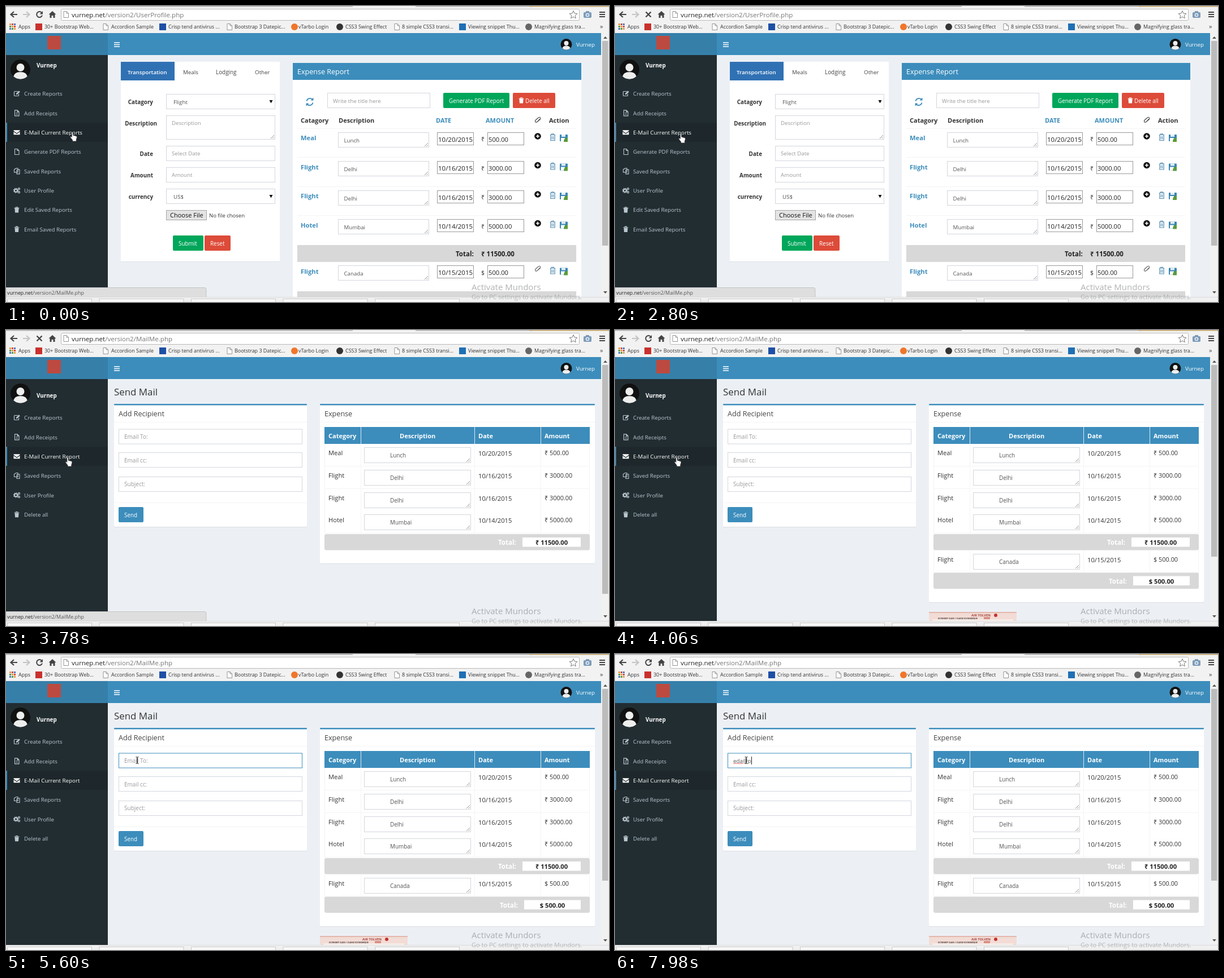
An HTML page that plays this animation: 1066 px wide and 525 px high, repeating every 8000 ms.

```html
<!DOCTYPE html>
<html lang="en">
<head>
<meta charset="utf-8">
<title>Expense report by mail</title>
<style>
html, body { margin: 0; width: 100%; height: 100%; overflow: hidden; background: #ecf0f5; }
svg { display: block; width: 1066px; height: 525px; font-family: "Open Sans", "Noto Sans", sans-serif; }
</style>
</head>
<body>
<svg id="stage" viewBox="0 0 1066 525" xmlns="http://www.w3.org/2000/svg"></svg>
<script>
const LOOP = 8000;
const BLUE = '#3c8dbc', LINE = '#f4f4f4', EDGE = '#d2d6de', HINT = '#999', INK = '#333', SIDE = '#b8c7ce';
const HOST = 'vurnep.net', USER = 'Vurnep', TYPED = 'eda@p';

// y is the middle of the capitals
const text = (x, y, s, size, fill, more = '') =>
  `<text x="${x}" y="${y + size * .36}" font-size="${size}" fill="${fill}" ${more}>${s}</text>`;
const bold = (x, y, s, size, fill, more = '') => text(x, y, s, size, fill, 'font-weight="700" ' + more);
const rect = (x, y, x2, y2, fill, more = '') =>
  `<rect x="${x}" y="${y}" width="${x2 - x}" height="${y2 - y}" fill="${fill}" ${more}/>`;
const box = (x, y, x2, y2, stroke = EDGE, fill = '#fff', more = '') =>
  rect(x + .5, y + .5, x2 - .5, y2 - .5, fill, `stroke="${stroke}" ${more}`);
const path = (d, stroke, width = 1, fill = 'none', more = '') =>
  `<path d="${d}" stroke="${stroke}" stroke-width="${width}" fill="${fill}" ${more}/>`;
const dot = (x, y, r, fill) => `<circle cx="${x}" cy="${y}" r="${r}" fill="${fill}"/>`;
const group = (id, s, more = '') => `<g id="${id}" ${more}>${s}</g>`;
const at = (x, y, s) => `<g transform="translate(${x} ${y})">${s}</g>`;
const button = (x, y, x2, y2, fill, label, lx) =>
  rect(x, y, x2, y2, fill, 'rx="2"') + text(lx, (y + y2) / 2 + .5, label, 9.9, '#fff');
const area = (x, y, x2, y2) => box(x, y, x2, y2) +
  path(`M${x2 - 8} ${y2 - 2}l6-6M${x2 - 4.5} ${y2 - 2}l2.5-2.5`, '#888', .9);

const icons = {
  edit: c => path('M2-4h-5.5q-1 0-1 1v6q0 1 1 1h6q1 0 1-1v-2.500', c, 1.2) + path('M-1 1.500l.3-2 4.500-4.500 1.800 1.800-4.500 4.400z', c, .4, c),
  file: c => path('M-3.500-5h4.500l3 3v7h-7.500zM1-5v3h3', c, 1.1),
  lines: c => icons.file(c) + path('M-1.500 0h3.500M-1.500 2.500h3.500', c, .9),
  mail: c => path('M-5.500-4h11v1.300l-5.500 4-5.500-4zM-5.500-1.300l5.500 4 5.500-4v5.300h-11z', 'none', 0, c),
  copy: c => path('M-1-5h3v7h-6.500v-5zM0-1.800l2.500-1h2.500v7.800h-5z', c, 1.1),
  cogs: c => `<circle cx="-1.500" r="2.600" fill="none" stroke="${c}" stroke-width="2"/>` +
    `<circle cx="-1.500" r="4" fill="none" stroke="${c}" stroke-width="1.300" stroke-dasharray="1.600 1.540"/>` +
    [-3, 3].map(y => `<circle cx="4" cy="${y}" r="1.500" fill="none" stroke="${c}" stroke-width="1.300"/>`).join(''),
  trash: c => path('M-3.500-2.500h7l-.5 7.500h-6z', 'none', 0, c) + path('M-4.500-3.200h9M-1.500-3.500v-1.300h3v1.300', c, 1.1),
  bin: c => path('M-4.500-4h9M-1.800-4v-1.800h3.600v1.800M-3.700-4v10h7.400v-10M-1.300-1.500v5.500M1.300-1.500v5.500', c, 1.1),
  page: () => path('M-4-5.500h5l3.500 3.500v7.500h-8.500zM1-5.500v3.500h3.500', '#888', .9, '#fff'),
  clip: c => path('M4-2l-5 5.500q-1.800 1.500-3.200 0-1-1.500.4-3l5-4.500q2-1.400 3.300 0 1.200 1.500-.3 3l-4.500 4', c, 1.1),
  save: () => rect(-7, -6, 7, 6, '#3a86b4', 'rx="1"') + rect(-4, -6, 3, -2, '#e4edf2') + rect(-5, 0, 2, 6, '#fff') +
    path('M0 7q0-8 7-7.500v7.500z', 'none', 0, '#5a9a3a'),
};
const icon = (name, x, y, c) => at(x, y, icons[name](c));

const avatar = (x, y, r) => {
  const k = r / 10;
  return dot(x, y, r, '#111') + dot(x, y - 2 * k, 4 * k, '#eee') +
    path(`M${x - 7 * k} ${y + 7 * k}q${k}-${4.5 * k} ${7 * k}-${4.5 * k}t${7 * k} ${4.5 * k}q-${3 * k} ${2.8 * k}-${7 * k} ${2.8 * k}t-${7 * k}-${2.8 * k}`, 'none', 0, '#eee');
};

const url = (file) => `<tspan fill="#222">${HOST}</tspan>/version2/${file}`;

function browser() {
  const marks = [
    [68, '30+ Bootstrap Web...', 'square', 58, '#c9302c'], [186, 'Accordion Sample', 'page', 176],
    [287, 'Crisp tend antivirus ...', 'square', 277, '#1d4fa5'], [404, 'Bootstrap 3 Datepic...', 'page', 395],
    [517, 'vTarbo Login', 'circle', 510, '#f0762b'], [600, 'CSS3 Swing Effect', 'circle', 590, '#333'],
    [700, '8 simple CSS3 transi...', 'page', 691], [817, 'Viewing snippet Thu...', 'square', 807, '#1f6fb5'],
    [934, 'Magnifying glass tra...', 'circle', 924, '#666'],
  ];
  let s = rect(0, 0, 1066, 48, '#f2f2f2') + rect(0, 0, 613, 1.5, '#b4b4b4') + rect(724, 0, 930, 1.5, '#b4b4b4') +
    rect(926, 0, 1066, 1.5, '#c6a868') + box(97, 5, 1014, 26, '#b8b8b8', '#fff', 'rx="2"') +
    path('M20 15h-11M14 10l-5.500 5 5.500 5', '#444', 2.2) + path('M30 15h11M36 10l5.500 5-5.500 5', '#c4c4c4', 2.2) +
    group('reload', path('M63.500 12.500a5 5 0 1 0 .5 4', '#444', 2) + path('M65 9v5.500h-5.500z', 'none', 0, '#444')) +
    group('stop', path('M54.500 10.500l9 9M63.500 10.500l-9 9', '#444', 2.4)) +
    path('M75.500 15l6.500-6 6.500 6h-2v6h-3v-4h-3v4h-3v-6z', 'none', 0, '#444') + icon('page', 106, 15) +
    path('M1003 8.500l2 4.500 5 .5-3.700 3.300 1 4.900-4.300-2.500-4.300 2.500 1-4.900-3.700-3.300 5-.5z', '#777', 1, '#fff') +
    rect(1021, 11, 1035, 21, '#7d9cba', 'rx="2"') + rect(1025, 9, 1031, 12, '#7d9cba') + dot(1028, 16, 3.3, '#e9f0f6') + dot(1028, 16, 1.8, '#7d9cba') +
    path('M1049 11h10M1049 15h10M1049 19h10', '#444', 2);
  const tones = ['#d9453d', '#e8963a', '#4a9a4a', '#4377c4'];
  for (let i = 0; i < 9; i++) s += rect(6 + i % 3 * 4, 31 + (i / 3 | 0) * 4, 9 + i % 3 * 4, 34 + (i / 3 | 0) * 4, tones[(i * 3 + 1) % 4]);
  s += text(22, 37, 'Apps', 9, INK);
  for (const [x, label, kind, ix, c] of marks) {
    s += kind === 'page' ? icon('page', ix, 37) : kind === 'circle' ? dot(ix, 37, 6, c) : rect(ix - 6, 31, ix + 6, 43, c);
    s += text(x, 37, label, 8.95, INK);
  }
  return s + text(1050, 36.5, '»', 11, '#444') +
    ['UserProfile', 'MailMe'].map((f, i) => group('url' + i, text(116, 15.5, url(f + '.php'), 11.6, '#777'))).join('');
}

function header() {
  return rect(0, 48, 180, 87, '#367fa9') + rect(180, 48, 1052, 87, BLUE) + rect(73, 53, 97, 77, '#bd4a40') +
    path('M191 65h10M191 68.500h10M191 72h10', '#fff', 1.5) + avatar(990.5, 68, 10) + text(1008, 68.5, USER, 9.7, '#fff') +
    rect(0, 87, 180, 516, '#222d32') + rect(0, 207, 180, 241, '#1e282c') + rect(0, 207, 2, 241, BLUE) + avatar(25.5, 112.5, 17.5);
}

const menu = (items, nameY) => bold(54, nameY, USER, 9.8, '#fff') + items.map(([ic, label], i) => {
  const y = 155.5 + i * 34.35, c = i === 2 ? '#fff' : SIDE;
  return icon(ic, 19, y, c) + text(32, y + .3, label, 9.75, c);
}).join('');

function formPage() {
  let s = menu([['edit', 'Create Reports'], ['lines', 'Add Receipts'], ['mail', 'E-Mail Current Reports'],
    ['file', 'Generate PDF Reports'], ['copy', 'Saved Reports'], ['cogs', 'User Profile'],
    ['trash', 'Edit Saved Reports'], ['trash', 'Email Saved Reports']], 105);
  s += rect(203, 100, 484, 454, '#dde1e6') + rect(203, 99, 484, 453, '#fff') + rect(203, 99, 298, 132, '#3071b4') +
    text(215, 117.5, 'Transportation', 9.7, '#fff', 'font-weight="600"') +
    text(313, 117.5, 'Meals', 9.8, '#444') + text(371, 117.5, 'Lodging', 9.9, '#444') + text(440, 117.5, 'Other', 9.8, '#444');
  for (const [x, y, label] of [[260, 170, 'Catagory'], [267, 208, 'Description'], [260, 262, 'Date'], [260, 300, 'Amount'], [260, 338.5, 'currency']])
    s += bold(x, y, label, 9.9, INK, 'text-anchor="end"');
  s += box(283, 156, 476, 183) + box(283, 248, 476, 275) + box(283, 286, 476, 313) + box(283, 324, 476, 351) + area(283, 194, 476, 237);
  for (const [y, label] of [[170, 'Flight'], [338, 'US$']])
    s += text(296, y, label, 9.8, '#555') + path(`M465.500 ${y - 3}h6l-3 5.500z`, 'none', 0, '#111');
  for (const [y, label] of [[208, 'Description'], [262, 'Select Date'], [300, 'Amount']]) s += text(293, y, label, 9.7, HINT);
  s += box(283, 362, 355, 380, '#a6a6a6', '#e4e4e4') + text(290, 371.5, 'Choose File', 11, '#111') + text(359, 371.5, 'No file chosen', 9.5, INK) +
    button(295, 407, 349, 434, '#00a65a', 'Submit', 305) + button(351, 407, 397, 434, '#dd4b39', 'Reset', 361);

  s += rect(507, 101, 1017, 516, '#fff') + rect(507, 101, 1017, 131, BLUE) + text(515, 116.5, 'Expense Report', 12.55, '#fff') +
    path('M531.500 168.500a6 6 0 0 1 10-3M542.500 171.500a6 6 0 0 1-10 3', BLUE, 1.8) +
    path('M543.500 162.500v5h-5zM530.500 177.500v-5h5z', 'none', 0, BLUE) +
    box(568, 154, 750, 181) + text(578, 168, 'Write the title here', 9.75, HINT) +
    button(773, 154, 890, 181, '#00a65a', 'Generate PDF Report', 783) +
    button(896, 154, 971, 181, '#dd4b39', 'Delete all', 918) + icon('trash', 911, 167.5, '#fff');
  for (const [x, label, c] of [[521, 'Catagory', INK], [588, 'Description', INK], [760, 'DATE', BLUE], [848, 'AMOUNT', BLUE], [960, 'Action', INK]])
    s += bold(x, 203.5, label, 11, c);
  s += icon('clip', 940, 202, '#444');
  const rows = [['Meal', 'Lunch', '10/20/2015', '₹', '500.00'], ['Flight', 'Delhi', '10/16/2015', '₹', '3000.00'],
    ['Flight', 'Delhi', '10/16/2015', '₹', '3000.00'], ['Hotel', 'Mumbai', '10/14/2015', '₹', '5000.00'],
    ['Flight', 'Canada', '10/15/2015', '$', '500.00']];
  rows.forEach(([kind, note, date, sign, sum], i) => {
    const y = i < 4 ? 234 + i * 51.5 : 470.5, r = Math.floor(y);
    s += (i < 4 ? rect(515, r - 17, 1008, r - 16, LINE) : '') + bold(521, y, kind, 11.2, BLUE) +
      area(587, r - 10, 748, r + 17) + text(597.5, y + 4.5, note, 9.7, '#555') +
      box(762, r - 10, 827, r + 13, '#999') + text(764, y + 2.5, date, 11.5, '#222') +
      text(840, y + 2.5, sign, 10.5, INK) + box(851, r - 10, 916, r + 13, '#999') + text(853, y + 2.5, sum, 11.2, '#222') +
      icon('bin', 966.5, y - 1.5, '#4b87ac') + icon('save', 986, y) +
      (i < 4 ? dot(940, y - 3, 5.8, '#111') + path(`M937 ${y - 3}h6M940 ${y - 6}v6`, '#fff', 1.6) : icon('clip', 940, y - 4.5, '#666'));
  });
  return s + rect(515, 424, 1008, 454, '#d8d8d8') + bold(795, 440, 'Total:', 11.5, '#222') + bold(840, 440, '₹ 11500.00', 11.5, '#222') +
    rect(515, 506, 1008, 516, '#d8d8d8');
}

const mailRow = ([kind, note, date, sum], y) =>
  rect(563, y - 16, 1032, y + 24, '#fff') + rect(563, y + 23, 1032, y + 24, LINE) +
  [563, 627, 828, 945, 1031].map(x => rect(x, y - 16, x + 1, y + 24, LINE)).join('') +
  text(570, y + .5, kind, 11.1, INK) + area(633, y - 10, 822, y + 18) + text(679, y + 4.5, note, 9.9, '#555') +
  text(835, y + .5, date, 11.2, INK) + text(952, y + .5, sum, 10.9, INK);
const totalRow = (y, x, sum) => rect(563, y, 1032, y + 28.5, '#d8d8d8', 'rx="3"') +
  bold(x - 43, y + 15, 'Total:', 11.5, '#fff') + rect(x, y + 6, 1016, y + 22.5, '#fff') +
  bold((x + 1016) / 2, y + 15, sum, 11.2, '#222', 'text-anchor="middle"');
const panel = (x, x2, y2, title) => rect(x, 133, x2, y2 + 1, '#d9dde2', 'rx="2"') + rect(x, 131, x2, y2, '#fff', 'rx="2"') +
  rect(x, 131, x2, 133.4, BLUE, 'rx="1"') + rect(x, 163, x2, 164, LINE) + text(x + 8, 148.5, title, 12.6, '#444');

function mailPage() {
  let s = menu([['edit', 'Create Reports'], ['lines', 'Add Receipts'], ['mail', 'E-Mail Current Report'],
    ['copy', 'Saved Reports'], ['cogs', 'User Profile'], ['trash', 'Delete all']], 116);
  s += text(191, 109.5, 'Send Mail', 16.9, INK) + panel(191, 532, 349, 'Add Recipient') +
    `<rect id="field" x="199.500" y="176" width="324" height="26" fill="#fff"/>` + box(199, 217, 524, 244) + box(199, 260, 524, 287) +
    text(209, 189, 'Email To:', 10, HINT, 'id="hint"') + text(209, 231.5, 'Email cc:', 10, HINT) + text(209, 273.5, 'Subject:', 10, HINT) +
    rect(191, 306, 532, 307, LINE) + button(199, 314, 243, 341, BLUE, 'Send', 209) +
    text(209, 189, '', 9.8, '#555', 'id="typed"') +
    path('M209 195' + 'l1.500-1.500 1.500 1.500'.repeat(6), '#d33', .8, 'none', 'id="wave"') +
    group('caret', rect(0, 182, 1, 196, '#222')) +
    group('offer', box(199, 202, 525, 222, '#b0b0b0') + text(209, 212, 'eda@qvolm.net', 9.8, '#222'));

  const shared = rect(563, 172, 1032, 202, BLUE) + [627, 828, 945].map(x => rect(x, 172, x + 1, 202, '#dfeaf1')).join('') +
    bold(570, 188, 'Category', 11, '#fff') + bold(696, 188, 'Description', 11, '#fff') + bold(835, 188, 'Date', 11, '#fff') + bold(952, 188, 'Amount', 11, '#fff') +
    [['Meal', 'Lunch', '10/20/2015', '₹ 500.00'], ['Flight', 'Delhi', '10/16/2015', '₹ 3000.00'],
      ['Flight', 'Delhi', '10/16/2015', '₹ 3000.00'], ['Hotel', 'Mumbai', '10/14/2015', '₹ 5000.00']]
      .map((r, i) => mailRow(r, Math.round(218 + i * 39.8))).join('') + totalRow(362, 913, '₹ 11500.00');
  const ticket = rect(555, 500, 710, 516, '#f2dcd5', 'rx="3"') + rect(555, 500, 710, 502, '#e3b8ad') + rect(561, 513.5, 704, 516, '#faf1ec') +
    bold(630, 506, 'AIR TOLVEN', 5.8, '#a8433f') + dot(673, 506, 3, '#c4322f') +
    bold(571, 511.5, 'ECONOMY CLASS / CLASSE ECONOMIQUE', 3.7, '#4a3c3c', 'font-style="italic"') + rect(652, 509, 663, 513, '#d98f84');
  return s + group('short', panel(555, 1041, 414, 'Expense')) +
    group('long', panel(555, 1041, 483, 'Expense') + mailRow(['Flight', 'Canada', '10/15/2015', '$ 500.00'], 407) +
      totalRow(430.5, 916, '$ 500.00') + ticket) + shared;
}

function chrome() {
  let s = rect(1052, 48, 1066, 516, '#f1f1f1') + `<rect id="thumb" x="1054" y="62" width="10.500" fill="#bcbcbc"/>` +
    path('M1056 58l3.500-4 3.500 4zM1056 506l3.500 4 3.500-4z', 'none', 0, '#555') +
    group('status', path('M0 499.500h351q3 0 3 3v14h-354z', '#c4c4c4', 1, '#dedede') + text(2, 508.5, url('MailMe.php'), 8.85, '#555')) +
    rect(0, 516, 1066, 525, '#f0f0f0') + rect(0, 516, 1066, 517, '#dadada');
  for (let i = 0; i < 5; i++) s += box(2 + i * 162.5, 519, 152 + i * 162.5, 528, '#c9c9c9', '#f8f8f8');
  return s + text(823, 499, 'Activate Mundors', 15, '#8f9296', 'opacity=".7"') +
    text(823, 516.5, 'Go to PC settings to activate Mundors.', 11, '#8f9296', 'opacity=".6"');
}

const pointers =
  group('hand', path('M3.300 1.500q1.300-1.300 2.400.2v5l5.300 1.400q1.700.6 1.500 2.400l-1.200 4v3h-6.800v-2l-3.700-5q-.6-2 1.500-1.400l1 1z', '#333', .9, '#fff')) +
  group('arrow', path('M.5.5v12.500l3-2.700 2 4.500 1.800-.8-2-4.300h3.700z', '#222', .9, '#fff')) +
  group('beam', path('M.500.500q2.200 0 2.500 1v10q-.3 1-2.500 1M5.500.500q-2.200 0-2.500 1v10q.3 1 2.500 1', '#222', 1));

const stage = document.getElementById('stage');
stage.innerHTML = rect(180, 87, 1052, 516, '#ecf0f5') + browser() + header() +
  group('form', formPage()) + group('mail', mailPage()) + chrome() + pointers;

const el = id => document.getElementById(id);
const show = (id, on) => el(id).setAttribute('visibility', on ? 'inherit' : 'hidden');
const last = (steps, t) => steps.filter(s => s[0] <= t).pop();

const moves = [[0, 'hand', 113, 222.5], [2800, 'hand', 112, 225.5], [2940, 'hand', 106, 225.5], [3080, 'hand', 104.5, 225.5],
  [3220, 'hand', 104.5, 224.5], [4340, 'hand', 127, 218], [4480, 'arrow', 206, 211], [4620, 'beam', 220.5, 190], [4760, 'beam', 229, 182]];
const keys = [[0, 0], [6160, 1], [6580, 2], [6720, 3], [7560, 4], [7980, 5]];
const within = (t, a, b) => t >= a && t < b;

function draw(t) {
  const mail = t >= 3780, full = t >= 4060, count = last(keys, t)[1];
  show('form', !mail);
  show('mail', mail);
  show('short', mail && !full);
  show('long', full);
  show('url0', t < 3640);
  show('url1', t >= 3640);
  show('stop', within(t, 420, 4060));
  show('reload', !within(t, 420, 4060));
  show('status', !full);
  el('status').setAttribute('opacity', t >= 3920 ? .5 : 1);
  el('thumb').setAttribute('height', full ? 340 : mail ? 406 : 363);

  el('field').setAttribute('stroke', t >= 5320 ? BLUE : t >= 5180 ? '#87b2cd' : EDGE);
  show('hint', mail && !count);
  el('typed').textContent = TYPED.slice(0, count);
  show('wave', count > 3);
  show('offer', within(count, 1, 5));
  show('caret', within(t, 5180, 5600) || within(t, 6160, 7140) || t >= 7560);
  const end = count ? el('typed').getComputedTextLength() : 0;
  el('caret').setAttribute('transform', `translate(${Math.round(209 + end)} 0)`);

  const [, shape, x, y] = last(moves, t);
  for (const id of ['hand', 'arrow', 'beam']) show(id, id === shape);
  el(shape).setAttribute('transform', `translate(${x} ${y})`);
}

const start = performance.now();
function tick() {
  draw((performance.now() - start) % LOOP);
  requestAnimationFrame(tick);
}
tick();
</script>
</body>
</html>
```
